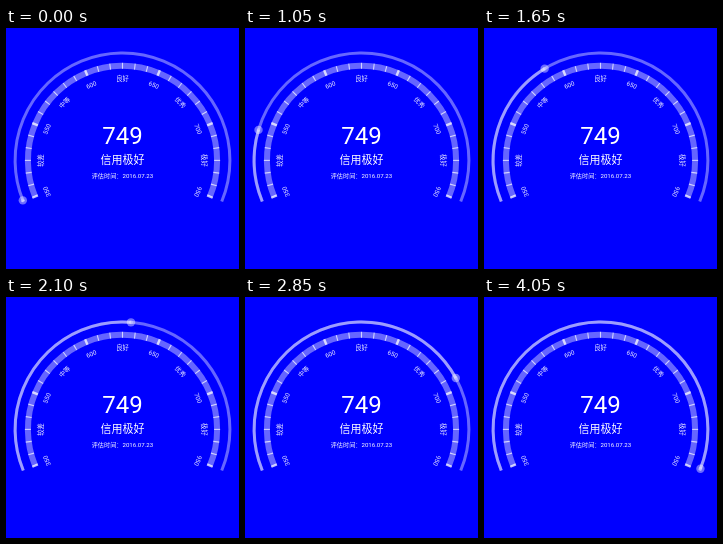
Recreate the animation shown at these times as an HTML page with a canvas. Size 233x241 px, loop 4200 ms.

```html
<!DOCTYPE html>
<html lang="zh-CN">
<head>
<meta charset="utf-8">
<style>
  html, body { margin: 0; width: 100%; height: 100%; overflow: hidden; background: #00f; }
  canvas { display: block; width: 233px; height: 241px; }
</style>
</head>
<body>
<canvas id="stage" width="233" height="241"></canvas>
<script>
const ctx = document.getElementById('stage').getContext('2d');
const LOOP = 4200, STEP = 150;
const CX = 116.5, CY = 132.4;
const TRACK_R = 107.4, BAND_R = 94.6, LABEL_R = 81.8;
const START = 157.5, SWEEP = 225, TICKS = 30;
const LABELS = ['350', '较差', '550', '中等', '600', '良好', '650', '优秀', '700', '极好', '950'];
const FONT = 'Roboto, "Noto Sans CJK SC", "Noto Sans CJK", sans-serif';

const rad = deg => deg * Math.PI / 180;
const white = alpha => `rgba(255,255,255,${alpha})`;

function arc(radius, sweep, width, alpha) {
  ctx.beginPath();
  ctx.arc(0, 0, radius, rad(START), rad(START + sweep));
  ctx.lineWidth = width;
  ctx.strokeStyle = white(alpha);
  ctx.stroke();
}

function disc(x, y, radius, alpha) {
  ctx.beginPath();
  ctx.arc(x, y, radius, 0, Math.PI * 2);
  ctx.fillStyle = white(alpha);
  ctx.fill();
}

function text(str, y, size, alpha = 1) {
  ctx.font = `${size}px ${FONT}`;
  ctx.fillStyle = white(alpha);
  ctx.fillText(str, 0, y);
}

// Runs the callback with "up" pointing away from the centre at the given angle.
function facing(angle, paint) {
  ctx.save();
  ctx.rotate(rad(angle + 90));
  paint();
  ctx.restore();
}

function drawScale() {
  for (let i = 0; i <= TICKS; i++) {
    const major = i % 6 === 0;
    facing(START + SWEEP * i / TICKS, () => {
      ctx.beginPath();
      ctx.moveTo(0, -BAND_R - 3);
      ctx.lineTo(0, -BAND_R + 3);
      ctx.lineWidth = major ? 2.4 : 1.1;
      ctx.strokeStyle = white(major ? 0.75 : 0.7);
      ctx.stroke();
    });
  }
  LABELS.forEach((label, i) => {
    facing(START + SWEEP * i / (LABELS.length - 1), () => text(label, -LABEL_R + 2.3, 6.3, 0.95));
  });
}

function sweepAt(time) {
  const phase = 0.034 + time * 0.000228;
  return SWEEP * (1 - Math.cos(Math.PI * phase)) / 2;
}

function draw(time) {
  const sweep = sweepAt(time);
  ctx.setTransform(1, 0, 0, 1, 0, 0);
  ctx.fillStyle = '#00f';
  ctx.fillRect(0, 0, 233, 241);
  ctx.translate(CX, CY);
  ctx.textAlign = 'center';

  arc(BAND_R, SWEEP, 6, 0.4);
  arc(TRACK_R, SWEEP, 3, 0.4);
  drawScale();
  arc(TRACK_R, sweep, 3, 0.36);

  const end = rad(START + sweep);
  const x = TRACK_R * Math.cos(end), y = TRACK_R * Math.sin(end);
  disc(x, y, 4.2, 0.42);
  disc(x, y, 2, 0.25);

  text('749', -16.2, 24);
  text('信用极好', 3.2, 11);
  text('评估时间：2016.07.23', 17.2, 6.15);
}

function tick() {
  const time = performance.now() % LOOP;
  draw(Math.floor(time / STEP) * STEP);
  requestAnimationFrame(tick);
}
tick();
</script>
</body>
</html>
```
